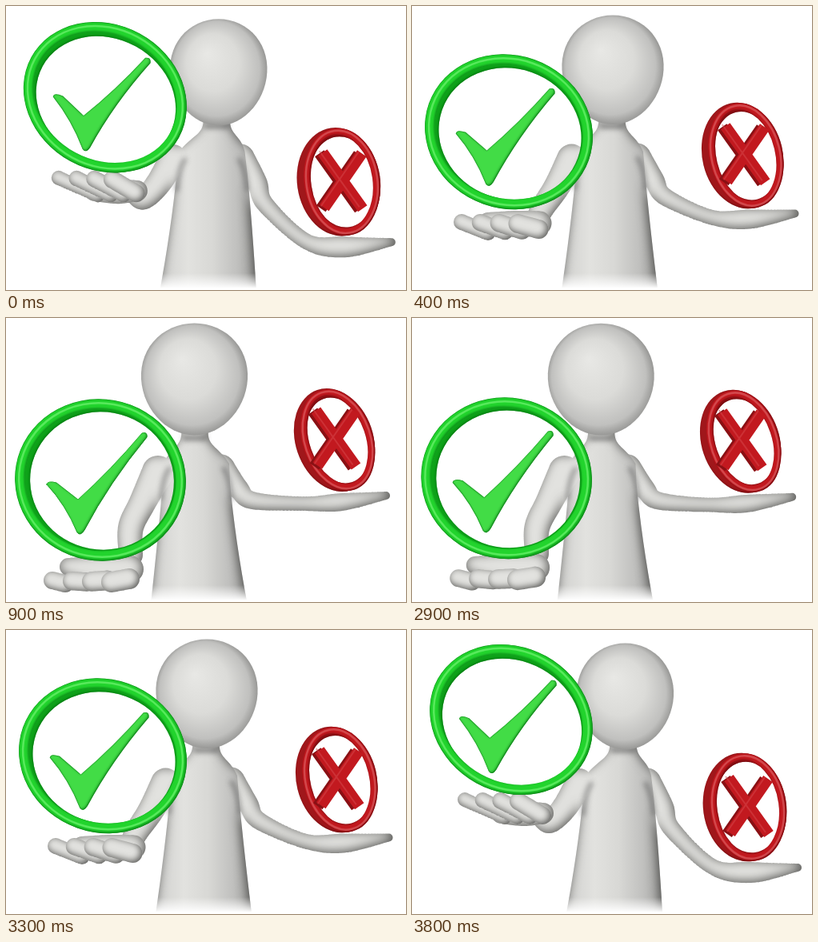
Animation of 500 by 355 pixels, one loop 5800 ms. Source, as an HTML page:

```html
<!DOCTYPE html>
<html lang="en">
<head>
<meta charset="utf-8">
<title>Weighing yes and no</title>
<style>
  html, body { margin: 0; width: 100%; height: 100%; overflow: hidden; background: #fff; }
  svg { display: block; width: 500px; height: 355px; }
</style>
</head>
<body>
<svg id="stage" viewBox="0 0 500 355" fill="none" stroke-linecap="round" stroke-linejoin="round">
  <defs id="defs">
    <radialGradient id="headFill" cx=".5" cy=".5" r=".54" fx=".38" fy=".32">
      <stop offset="0" stop-color="#e8e8e5"/>
      <stop offset=".5" stop-color="#dbdbd8"/>
      <stop offset=".82" stop-color="#c0c0be"/>
      <stop offset="1" stop-color="#868684"/>
    </radialGradient>
    <linearGradient id="torsoFill">
      <stop offset="0" stop-color="#cfcfcd"/>
      <stop offset=".3" stop-color="#e2e2df"/>
      <stop offset=".55" stop-color="#d8d8d5"/>
      <stop offset=".8" stop-color="#c0c0be"/>
      <stop offset="1" stop-color="#a0a09e"/>
    </linearGradient>
    <linearGradient id="fadeFill" x1="0" y1="0" x2="0" y2="1">
      <stop offset="0" stop-color="#fff" stop-opacity="0"/>
      <stop offset="1" stop-color="#fff"/>
    </linearGradient>
    <filter id="blur" filterUnits="userSpaceOnUse" x="0" y="0" width="500" height="400">
      <feGaussianBlur stdDeviation="3"/>
    </filter>
  </defs>
</svg>
<script>
const stage = document.getElementById('stage');
const movers = [];

const mix = (a, b, p) => Array.isArray(a) ? a.map((v, i) => mix(v, b[i], p)) : a + (b - a) * p;

function add(tag, attrs, parent = stage) {
  const el = document.createElementNS('http://www.w3.org/2000/svg', tag);
  for (const key in attrs) el.setAttribute(key, attrs[key]);
  parent.append(el);
  return el;
}

function shape(attrs, pathAt, parent) {
  const el = add('path', attrs, parent);
  movers.push(p => el.setAttribute('d', pathAt(p)));
}

// Darkens the inside rim, heavier away from the light.
function rimFilter(id, color, spread, shift, opacity) {
  const f = add('filter', { id, filterUnits: 'userSpaceOnUse', x: 0, y: 0, width: 500, height: 400,
    'color-interpolation-filters': 'sRGB' }, document.getElementById('defs'));
  add('feGaussianBlur', { in: 'SourceAlpha', stdDeviation: spread }, f);
  add('feOffset', { dx: -shift, dy: -shift, result: 'core' }, f);
  add('feFlood', { 'flood-color': color, 'flood-opacity': opacity }, f);
  add('feComposite', { operator: 'out', in2: 'core' }, f);
  add('feComposite', { operator: 'in', in2: 'SourceAlpha', result: 'rim' }, f);
  const merge = add('feMerge', {}, f);
  add('feMergeNode', { in: 'SourceGraphic' }, merge);
  add('feMergeNode', { in: 'rim' }, merge);
}

function oval([cx, cy, rx, ry, turn], inset = 0) {
  const a = rx - inset, b = ry - inset, r = turn * Math.PI / 180;
  const x = a * Math.cos(r), y = a * Math.sin(r);
  return `M${cx - x} ${cy - y}A${a} ${b} ${turn} 1 1 ${cx + x} ${cy + y}` +
         `A${a} ${b} ${turn} 1 1 ${cx - x} ${cy - y}Z`;
}

// Like an ellipse, but narrower towards the chin.
function egg([cx, cy, rx, ry]) {
  const points = Array.from({ length: 60 }, (_, i) => {
    const a = i * Math.PI / 30;
    return [cx + rx * Math.cos(a) * (1 - .06 * Math.sin(a)), cy + ry * Math.sin(a)];
  });
  return 'M' + points.join('L') + 'Z';
}

// Sweeps a circle of changing radius along a smooth line of [x, y, r] joints.
function limb(joints, steps = 16) {
  const at = i => joints[Math.max(0, Math.min(joints.length - 1, i))];
  let d = '';
  for (let i = 0; i < joints.length - 1; i++) {
    for (let s = 0; s <= steps; s++) {
      const t = s / steps;
      const [x, y, r] = at(i).map((b, k) => {
        const a = at(i - 1)[k], c = at(i + 1)[k], e = at(i + 2)[k];
        return b + t / 2 * (c - a + t * (2 * a - 5 * b + 4 * c - e + t * (3 * (b - c) + e - a)));
      });
      d += oval([x, y, r, r, 0]);
    }
  }
  return d;
}

function torso(p) {
  const neck = mix(264, 236, p), chest = mix(258, 238, p), hip = mix(252.5, 241.5, p);
  const half = mix(44.5, 42, p), armpit = mix(212, 206, p);
  const side = s => [
    [neck + 17 * s, 138], [neck + 14 * s, 161], [neck + 30 * s, 160], [chest + 41 * s, 182],
    [chest + half * s, armpit], [chest + (half + 6) * s, 275], [hip + 61 * s, 362]
  ];
  const r = side(1), l = side(-1);
  return `M${r[0]}C${r[1]} ${r[2]} ${r[3]}L${r[4]}Q${r[5]} ${r[6]}L${r[6][0]} 380H${l[6][0]}` +
         `L${l[6]}Q${l[5]} ${l[4]}L${l[3]}C${l[2]} ${l[1]} ${l[0]}Z`;
}

function crease(s) {
  shape({ stroke: '#444', 'stroke-width': 5, opacity: .5, filter: 'url(#blur)' }, p => {
    const x = mix(258, 238, p), y = mix(210, 206, p);
    return `M${x + 34 * s} ${y - 18}Q${x + 42 * s} ${y - 6} ${x + 44 * s} ${y + 20}`;
  });
}

// The lean shows the outer wall on the left of the front face.
function ring({ outer, hole, width, lean, colors: [wall, face, shine], rim }) {
  const front = p => {
    const [cx, cy, rx, ...rest] = mix(...outer, p);
    return [cx + lean, cy, rx - lean, ...rest];
  };
  shape({ fill: wall, 'fill-rule': 'evenodd', filter: rim }, p => oval(mix(...outer, p)) + oval(mix(...hole, p)));
  shape({ stroke: face, 'stroke-width': width, filter: rim }, p => oval(front(p), width / 2 + .5));
  shape({ stroke: shine, 'stroke-width': 2.5, opacity: .6 }, p => oval(front(p), width / 2 - 1));
}

rimFilter('grayRim', '#3c3c3a', 6.5, 2.5, .85);
rimFilter('fingerRim', '#3c3c3a', 4, 2, .85);
rimFilter('greenRim', '#04700f', 1.8, .8, .85);
rimFilter('redRim', '#5c0307', 1.8, .8, .85);

// Every part runs from "check high" to "check low".
const skin = '#e2e2df';
const body = add('g', { filter: 'url(#grayRim)' });
const rightArm = [
  [[292, 192, 20], [314, 221, 13], [325, 249, 11], [376, 296, 10], [424, 303, 13], [482, 297, 5]],
  [[267, 190, 20], [290, 213, 13], [308, 228, 11], [372, 232, 9], [420, 230, 11], [475, 222, 5]]
];
const leftArm = [
  [[209, 190, 17], [192, 220, 16], [172, 240, 14], [160, 230, 13]],
  [[190, 192, 20], [171, 230, 17], [156, 262, 16], [156, 296, 15]]
];
shape({ fill: skin }, p => limb(mix(...rightArm, p)), body);
shape({ fill: 'url(#torsoFill)' }, torso, body);
shape({ fill: skin }, p => limb(mix(...leftArm, p)), body);
crease(-1);
crease(1);

// Shadow under the chin.
shape({ stroke: '#444', 'stroke-width': 7, opacity: .55, filter: 'url(#blur)' },
  p => `M${mix(252, 224, p)} 150h24`);

add('rect', { x: 174, y: 334, width: 160, height: 19, fill: 'url(#fadeFill)' });
add('rect', { x: 174, y: 352.5, width: 160, height: 3, fill: '#fff' });

shape({ fill: 'url(#headFill)' }, p => egg(mix([266.5, 83, 60.5, 66.5], [235.5, 76.5, 66.5, 70], p)));

// Open hand under the check: a palm and four fingers fanned evenly.
const palm = [
  [[112, 229, 13], [140, 230, 15], [164, 229, 13]],
  [[78, 311, 11], [118, 315, 18], [155, 314, 17]]
];
const firstFinger = [[[66, 212, 9], [116, 235, 8]], [[58, 328, 11], [74, 332, 11]]];
const lastFinger = [[[133, 214, 11], [163, 232, 11]], [[132, 330, 13], [154, 326, 13]]];
shape({ fill: skin, filter: 'url(#grayRim)' }, p => limb(mix(...palm, p)));
for (let i = 0; i < 4; i++) {
  shape({ fill: skin, filter: 'url(#fingerRim)' },
    p => limb(mix(mix(...firstFinger, p), mix(...lastFinger, p), i / 3)));
}

ring({
  outer: [[124, 112, 105, 90.5, 29], [118, 202.5, 107, 101, 10]],
  hole: [[125, 116, 90, 77, 29], [120, 203.5, 90, 86, 10]],
  width: 12, lean: 0, colors: ['#0ea319', '#22d42d', '#7cf97c'], rim: 'url(#greenRim)'
});

// The check keeps its shape and only shears as the hand turns.
const tick = add('path', {
  d: 'M0 0Q1-5 12-2L39 19Q80-18 119-64Q126-66 125-59Q78-2 47 57Q42 65 38 60Q24 26 0 0Z',
  fill: '#42dc46', stroke: '#2cb932', 'stroke-width': 1
}, add('g', { filter: 'url(#greenRim)' }));
movers.push(p => tick.setAttribute('transform',
  `matrix(${mix(.965, 1, p)} ${mix(.137, 0, p)} 0 1 ${mix(59.5, 51, p)} ${mix(111, 208, p)})`));

ring({
  outer: [[416, 221.5, 52, 68, -8], [410.5, 152.5, 48.5, 66, -19]],
  hole: [[421, 221.5, 41, 57, -8], [415, 153, 37.5, 55, -19]],
  width: 9, lean: 4, colors: ['#a0171b', '#c2191f', '#e0666a'], rim: 'url(#redRim)'
});

const cross = add('g', { 'stroke-width': 14, 'stroke-linecap': 'butt' });
const bars = 'M-25-35L25 35M24-34L-23 34';
add('path', { d: bars, stroke: '#8a1014', transform: 'translate(-4 1)' }, cross);
add('path', { d: bars, stroke: '#c2191f' }, cross);
add('path', { d: bars, stroke: '#d84a4f', 'stroke-width': 2, opacity: .5, transform: 'translate(-4 -2)' }, cross);
movers.push(p => cross.setAttribute('transform', `translate(${mix(421, 412.5, p)} ${mix(220, 150.5, p)})`));

// Ten eased steps down, a rest, ten back up, a rest.
const LOOP = 5800, STEP = 100, DOWN_END = 900, UP_START = 2900, UP_END = 3800;
function phase(t) {
  if (t < DOWN_END) return Math.floor(t / STEP) + 1;
  if (t < UP_START) return 10;
  if (t < UP_END) return 9 - Math.floor((t - UP_START) / STEP);
  return 0;
}

const start = performance.now();
let shown = -1;
function draw() {
  const step = phase((performance.now() - start) % LOOP);
  if (step !== shown) {
    shown = step;
    const p = (1 - Math.cos(Math.PI * step / 10)) / 2;
    movers.forEach(move => move(p));
  }
  requestAnimationFrame(draw);
}
draw();
</script>
</body>
</html>
```
